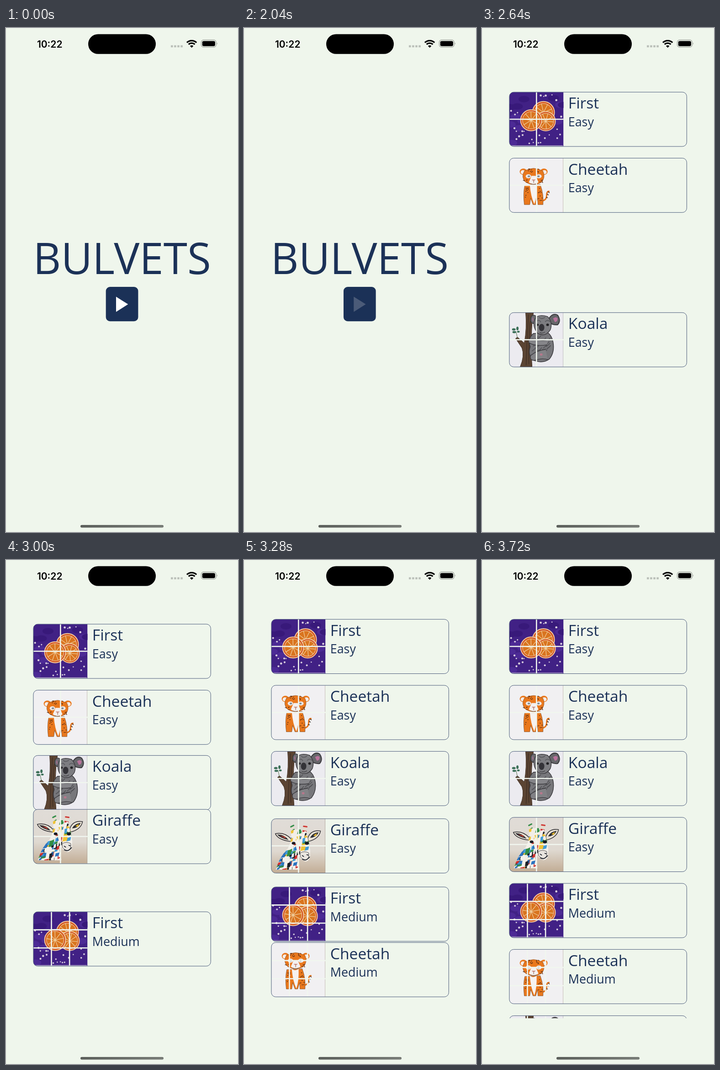
These frames come from a looping animation (508 by 1102 pixels, 3.76 s). An HTML page:

```html
<!DOCTYPE html>
<html lang="en">
<head>
<meta charset="utf-8">
<title>Puzzle app</title>
<style>
html, body { margin: 0; width: 100%; height: 100%; overflow: hidden; background: #eff6ec; }
svg { display: block; width: 100vw; height: 100vh; }
text { font-family: "Open Sans", "Noto Sans", sans-serif; fill: #1b3157; }
.name { font-size: 94.3px; text-anchor: middle; }
.title { font-size: 33.6px; }
.level { font-size: 26.8px; }
.clock { font: 600 21px Inter, sans-serif; text-anchor: middle; fill: #000; }
</style>
</head>
<body>
<svg viewBox="0 0 508 1102">
  <defs>
    <clipPath id="list"><rect width="508" height="1002"/></clipPath>
    <clipPath id="thumb"><path d="M9.5 .5H119V119H9.5a9 9 0 0 1-9-9V9.5a9 9 0 0 1 9-9Z"/></clipPath>
    <clipPath id="hide"><path d="M43 27Q60 20 76 28L81 47Q86 62 85 78Q87 91 76 94Q67 92 62 84Q57 78 56 88L62 112H10Q18 84 36 66Q46 50 43 27Z"/></clipPath>
    <linearGradient id="canvas" x2="0" y2="1"><stop offset="0" stop-color="#e0dcd7"/><stop offset=".6" stop-color="#dfd9d1"/><stop offset="1" stop-color="#c2ad95"/></linearGradient>
    <linearGradient id="bar" x2="1" y2="1"><stop offset="0" stop-color="#4c504c"/><stop offset="1" stop-color="#868a85"/></linearGradient>
  </defs>

  <g id="home">
    <rect width="508" height="1102" fill="#eff6ec"/>
    <text class="name" x="254" y="538.3">BULVETS</text>
    <rect x="218.7" y="566" width="70.7" height="75.2" rx="9" fill="#1b3157"/>
    <path id="play" d="M241 587.5 267.3 604 241 620.8Z"/>
  </g>
  <rect id="dim" width="508" height="1102"/>

  <g id="levels">
    <rect width="508" height="1102" fill="#eff6ec"/>
    <g id="cards" clip-path="url(#list)"></g>
  </g>

  <g id="status">
    <text class="clock" x="95.7" y="42.5">10:22</text>
    <rect x="180" y="13.4" width="148" height="43.4" rx="21.7"/>
    <path d="M361 40h26" stroke="#bbc0b9" stroke-width="4.4" stroke-dasharray="4.6 2.5"/>
    <path d="M396 31.9a15.3 15.3 0 0 1 21.2 0M399.8 35.9a9.8 9.8 0 0 1 13.6 0" fill="none" stroke="#000" stroke-width="3.3"/>
    <path d="M402.8 39.2a5.4 5.4 0 0 1 7.6 0L406.6 43.2Z"/>
    <rect x="427.5" y="26.2" width="32.6" height="15.7" rx="5" fill="none" stroke="#979c95" stroke-width="1.2"/>
    <rect x="429.7" y="28.4" width="28.2" height="11.4" rx="3.2"/>
    <path d="M461.8 31.5q2.2 2.5 0 5Z" fill="#979c95"/>
    <rect x="163" y="1086.8" width="182" height="5.6" rx="2.8" fill="url(#bar)"/>
  </g>
</svg>

<script>
const LOOP = 3760, STEP = 40;
const $ = id => document.getElementById(id);

function seeded(seed) {
  return () => (seed = (seed * 16807) % 2147483647) / 2147483647;
}
const repeat = (n, fn) => Array.from({ length: n }, (_, i) => fn(i)).join('');
const dot = (x, y, rx, ry, fill) => `<ellipse cx="${x}" cy="${y}" rx="${rx}" ry="${ry}" fill="${fill}"/>`;
const shape = (d, fill, stroke = 'none', w = 1) =>
  `<path d="${d}" fill="${fill}" stroke="${stroke}" stroke-width="${w}" stroke-linecap="round" stroke-linejoin="round"/>`;
const line = (d, stroke, w) => shape(d, 'none', stroke, w);
const paper = fill => `<rect width="119" height="119" fill="${fill}"/>`;

function slice(x, y, r, turn) {
  const spokes = repeat(9, i => {
    const a = turn + i * Math.PI * 2 / 9;
    return `M${x} ${y}l${r * .8 * Math.cos(a)} ${r * .8 * Math.sin(a)}`;
  });
  return `<circle cx="${x}" cy="${y}" r="${r}" fill="#d2501b" stroke="#f0c9a0" stroke-width="2"/>` +
    `<circle cx="${x}" cy="${y}" r="${r * .82}" fill="#d9741f" stroke="#efc594" stroke-width="1.3"/>` +
    line(spokes, '#f0cb98', 1.3);
}

function oranges() {
  const rnd = seeded(71);
  const specks = repeat(50, () => {
    const x = 4 + rnd() * 110, y = 4 + rnd() * 110, r = 1.2 + rnd() * 1.3;
    return Math.hypot((x - 63) / 46, (y - 55) / 40) < 1 ? '' : dot(x, y, r, r, '#d9cfdf');
  });
  const wash = repeat(14, () => dot(rnd() * 119, rnd() * 119, 12, 7, rnd() < .5 ? '#38197a' : '#4c2a95'));
  return paper('#412185') + wash + specks +
    slice(75, 45, 24, .3) + slice(80, 64, 21, .1) + slice(48, 62, 23, .5) +
    line('M2 117.5H117', '#bdaed0', 1.2);
}

function cheetah() {
  const rnd = seeded(19);
  const spots = (n, x, y, w, h) => repeat(n, () => dot(x + rnd() * w, y + rnd() * h, 1.2, .9, '#5a2c12'));
  const fur = '#e9781d', ink = '#6d4326';
  return paper('#f1f0f2') +
    line('M72 94Q82 92 82 82T87 73', fur, 3) + line('M81 86l3 1M83 79l3 2M85 74l3 2', '#3a2212', 1.3) +
    dot(31, 30, 8, 7, fur) + dot(76, 30, 8, 7, fur) + dot(30, 31, 5, 4.5, '#f5ece6') + dot(77, 31, 5, 4.5, '#f5ece6') +
    shape('M34 60Q30 78 33 102H45L47 88 52 102H58L62 88 63 102H74Q76 80 68 58Z', fur, ink, .7) +
    shape('M45 58Q52 64 60 58Q61 84 55 101Q47 84 45 58Z', '#f6f2f0') +
    shape('M33 29Q53 16 74 29Q80 42 71 53Q53 63 36 53Q25 42 33 29Z', fur, ink, .6) +
    dot(42, 40, 6, 4.5, '#ece7e6') + dot(65, 40, 6, 4.5, '#ece7e6') +
    dot(43, 40, 2.6, 2, '#7d8a91') + dot(64, 40, 2.6, 2, '#7d8a91') +
    shape('M49 39H58L64 53Q53 62 43 53Z', '#f4f0ef') + shape('M49 47h9l-4.5 4Z', '#c88f85') +
    line('M53.5 51v3M47 56q6 3 13 0', ink, .9) +
    spots(14, 42, 24, 24, 8) + spots(5, 31, 46, 8, 8) + spots(5, 68, 46, 6, 8) +
    spots(10, 35, 64, 8, 30) + spots(10, 64, 64, 8, 30) +
    line('M118 0V119', '#b9aca6', .8);
}

function koala() {
  const rnd = seeded(43);
  const fur = '#77777b', dark = '#39383c';
  const strokes = repeat(26, () => {
    const x = 50 + rnd() * 34, y = 58 + rnd() * 40;
    return `M${x} ${y}q5 -3 8 -7`;
  });
  return paper('#ecebf0') +
    shape('M36 0H53Q45 55 50 119H24Q34 95 28 78L14 57 18 54 33 67Q39 35 36 0Z', '#5b4433', '#3d2c21', 1) +
    line('M42 5Q39 55 37 115M46 20Q42 70 43 112', '#402f25', 1.5) +
    line('M18 56 15 42', '#54704d', 1) +
    dot(10, 37, 4, 2.5, '#3d7059') + dot(18, 35, 2.5, 4, '#3d7059') + dot(11, 43, 4, 2.3, '#3d7059') + dot(20, 42, 3, 2, '#3d7059') +
    shape('M53 46Q40 57 46 75Q40 92 52 104Q72 113 88 102Q100 87 96 65Q93 50 84 44Z', fur, dark, 1.5) +
    line(strokes, '#505054', 1.6) +
    shape('M86 60Q71 63 52 58Q40 58 43 66Q56 75 82 71', '#858589', dark, 1.3) +
    shape('M80 81Q61 83 47 94Q44 104 54 105Q72 99 84 103', '#818185', dark, 1.3) +
    dot(70, 92, 3, 2.4, '#b7788c') +
    shape('M59 8Q49 2 47 14Q46 24 55 25Z', '#6b6b70', dark, 1.5) +
    shape('M87 13Q96 0 106 6Q114 18 106 27Q96 28 90 23Z', '#67676b', dark, 2) +
    shape('M96 13Q103 8 106 13Q106 20 100 21Z', '#b9739c') + shape('M52 10q-3 6 1 10Z', '#b9739c') +
    shape('M57 13Q64 3 84 9Q96 22 90 38Q79 55 63 46Q49 31 57 13Z', '#7d7d81', dark, 1.4) +
    line('M66 11Q70 16 78 11M60 19Q66 15 69 21M79 20Q84 15 89 20', '#55555a', 1.5) +
    dot(62, 27, 2.5, 2.5, '#201f22') + dot(84, 27, 3, 2.7, '#201f22') +
    dot(71, 33, 6, 8, '#343338') + line('M67 44q6 3 11-1', dark, 1.2) +
    line('M118 0V119', '#b4b0b5', .8);
}

function giraffe() {
  const rnd = seeded(28);
  const paints = ['#cf3130', '#2b73c0', '#efc235', '#328c46', '#1c2028', '#f4f1ec', '#3f9bd6', '#f4f1ec'];
  const patches = repeat(110, i => {
    const y = 24 + rnd() * 92, x = (y > 70 ? 6 : 32) + rnd() * 54;
    const w = 4 + rnd() * 6, h = 4 + rnd() * 7;
    return shape(`M${x} ${y}l${w} -2 ${-w * .2} ${h} ${-w} 2Z`, paints[i % paints.length]);
  });
  const ear = d => shape(d, '#e8e1d4', '#28272c', 1.4);
  return paper('url(#canvas)') +
    ear('M43 50Q15 47 9 33Q30 29 44 45Z') + ear('M80 43Q86 24 108 27Q105 44 82 50Z') +
    shape('M38 47Q20 43 13 35Q28 34 38 47Z', '#292b32') + shape('M85 42Q91 31 104 30Q98 42 85 42Z', '#292b32') +
    shape('M18 37l12 3 2 4Z', '#d54431') + shape('M92 37l8-5-2 7Z', '#e7b92f') +
    line('M48 34 46 20M70 33 74 18', '#e4dccd', 7) + line('M43 18l6-3M45 28l5-4', '#348d4a', 3) + line('M71 17l7 1M71 27l5 1', '#cf3836', 3) +
    `<g clip-path="url(#hide)">${paper('#f2eee7')}${patches}</g>` +
    shape('M56 34l6 2 1 34-5 7-4-16Z', '#f3efe8') + shape('M55 40l8-3-2 15Z', '#ecc33b') + shape('M58 57l6 5-2 9Z', '#d04439') +
    dot(49, 54, 4, 3, '#191b22') + dot(78, 54, 4.5, 3.5, '#191b22') +
    shape('M64 75Q72 70 82 75Q84 87 76 91Q68 89 64 84Z', '#e9e5df', '#28272c', .8) +
    line('M68 81l3 2M78 79l3 1M68 89Q76 94 84 84', '#20242c', 1.8) +
    line('M118 0V119', '#a99d92', .8);
}

function grid(n) {
  const d = repeat(n - 1, i => {
    const p = 119 * (i + 1) / n + .2;
    return `M${p} 0V119M0 ${p}H119`;
  });
  return line(d, '#f1f6ef', 2.6);
}

const art = { First: oranges, Cheetah: cheetah, Koala: koala, Giraffe: giraffe };
const easy = ['First', 'Cheetah', 'Koala', 'Giraffe'].map(n => [n, 'Easy', 2]);
const medium = ['First', 'Cheetah', 'Koala'].map(n => [n, 'Medium', 3]);

$('cards').innerHTML = [...easy, ...medium].map(([name, level, n]) => `<g>
  <rect x="59.9" y=".4" width="388.4" height="118.8" rx="9.5" fill="#eff6ec"/>
  <g transform="translate(59.6 0)"><g clip-path="url(#thumb)">${art[name]()}${grid(n)}</g></g>
  <rect x="59.9" y=".4" width="388.4" height="118.8" rx="9.5" fill="none" stroke="#4b5b7b"/>
  <text class="title" x="188.8" y="36.5">${name}</text>
  <text class="level" x="188.8" y="75">${level}</text></g>`).join('');
const cards = [...$('cards').children];

const mix = (a, b, u) => a + (b - a) * (1 - Math.cos(Math.PI * Math.min(1, Math.max(0, u)))) / 2;

// Critically damped push
function push(t) {
  if (t < 2040) return 0;
  if (t >= 2640) return 1;
  const x = (Math.min(t, 2440) - 2034.6) * .0186;
  return 1 - (1 + x) * Math.exp(-x);
}

// Each card rises, bumps the one above, then rocks into place
function drift(i, t) {
  if (i < 2) return mix(10.5, 0, (t - 3000) / 200);
  const s = t - 2580 - 140 * i, k = 1 - .07 * (i - 3);
  if (s < 0) return k * (-17.5 + 337 * (s / 280) ** 2);
  if (s < 140) return k * mix(-17.5, 8.4, s / 140);
  if (s < 280) return k * mix(8.4, 3, (s - 140) / 140);
  return k * mix(3, 0, (s - 280) / 30);
}

function draw(now) {
  const t = Math.floor((now % LOOP) / STEP) * STEP;
  const p = push(t);
  $('play').setAttribute('fill', t < 1120 ? '#fff' : '#4b5b78');
  $('home').setAttribute('transform', `translate(${-152.4 * p} 0)`);
  $('dim').setAttribute('opacity', .1 * p);
  $('levels').setAttribute('transform', `translate(${508 * (1 - p)} 0)`);
  $('cards').setAttribute('visibility', t < 2640 ? 'hidden' : 'visible');
  const run = t < 2920 ? 2640 : t;
  cards.forEach((card, i) =>
    card.setAttribute('transform', `translate(0 ${129.3 + 144.35 * i + drift(i, run)})`));
}

const start = performance.now();
function tick() {
  draw(performance.now() - start);
  requestAnimationFrame(tick);
}
tick();
</script>
</body>
</html>
```
